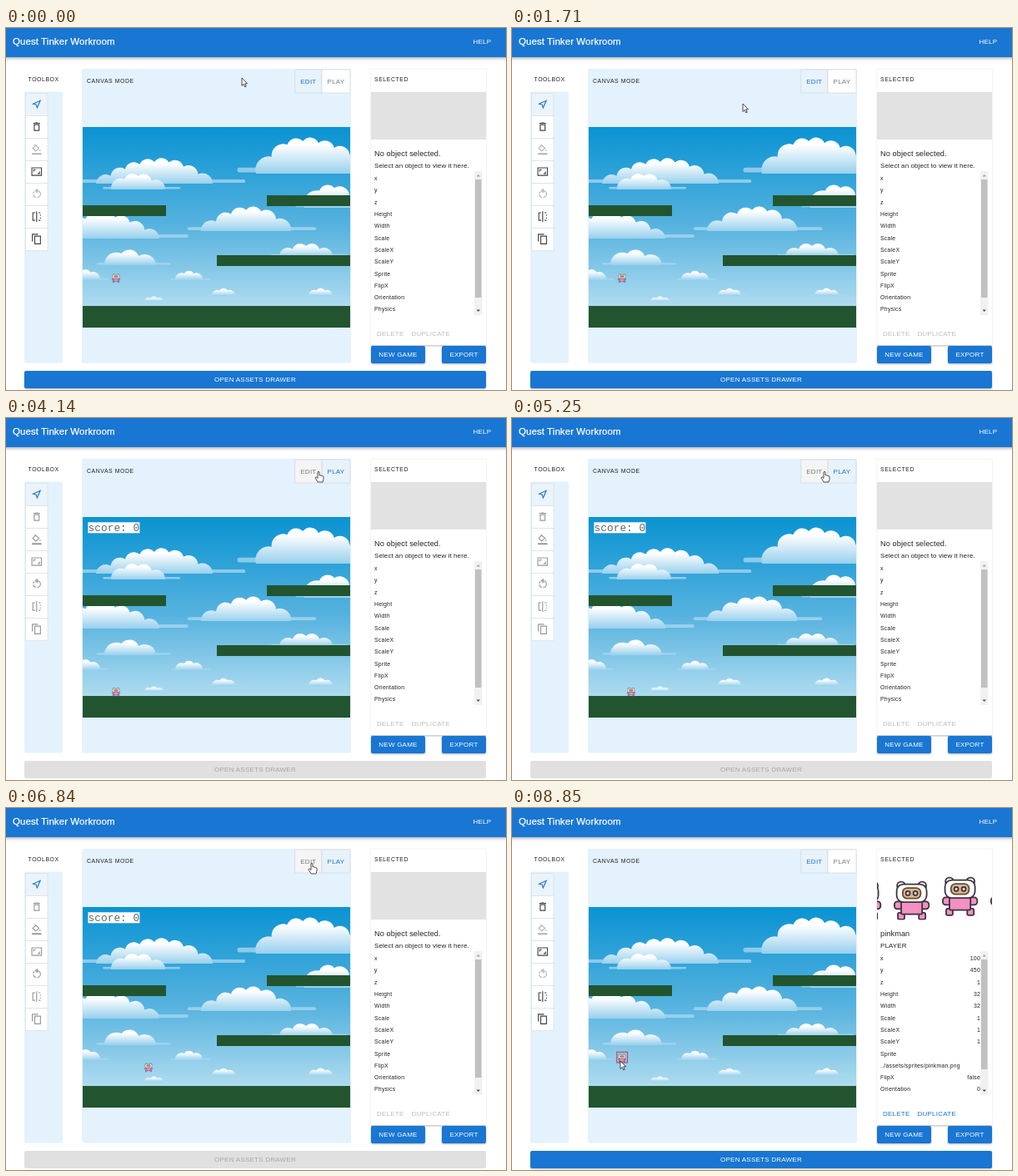
These frames come from a looping animation (600 by 435 pixels, 8.88 s). An HTML page:

```html
<!DOCTYPE html>
<html lang="en">
<head>
<meta charset="utf-8">
<title>Game editor</title>
<style>
  html, body { margin: 0; width: 100%; height: 100%; overflow: hidden; background: #fff; }
  svg { display: block; width: 100vw; height: 100vh; }
  text { font-family: "Liberation Sans", Arial, sans-serif; white-space: pre; }
  .mono { font-family: "Liberation Mono", "Courier New", monospace; }
  .bar { filter: drop-shadow(0 1px 2px rgba(0,0,0,.4)); }
  .raised { filter: drop-shadow(0 1px 1px rgba(0,0,0,.28)); }
</style>
</head>
<body>
<svg id="stage" viewBox="0 0 600 435"></svg>
<script>
const LOOP = 8880, PLAY_AT = 2400, EDIT_AT = 7020, SELECT_AT = 8350;
const BLUE = '#1976d2', PALE = '#e3f2fd', GREEN = '#22552f', INK = '#222';
const stage = document.getElementById('stage');

const rect = (x, y, w, h, fill, more = '') =>
  `<rect x="${x}" y="${y}" width="${w}" height="${h}" fill="${fill}" ${more}/>`;
const text = (x, y, str, size, gap, fill, more = '') =>
  `<text x="${x}" y="${y}" font-size="${size}" letter-spacing="${gap}" fill="${fill}" ${more}>${str}</text>`;
const MID = 'text-anchor="middle"', END = 'text-anchor="end"';
const label = (x, y, str, fill, more) => text(x, y, str, 8.03, .23, fill, more);
const small = (x, y, str, more) => text(x, y, str, 6.9, .23, INK, more);
const overline = (x, y, str) => text(x, y, str, 6.9, .57, INK);
const button = (x, y, w, str, on = true) =>
  rect(x, y, w, 21, on ? BLUE : '#e0e0e0', `rx="2" ${on ? 'class="raised"' : ''}`) +
  label(x + w / 2, y + 13.4, str, on ? '#fff' : '#a6a6a6', MID);

// A mound of arcs on a flat base, with a thin streak of mist across its foot.
function cloud(x1, x2, top, base, peak = .5) {
  const w = x2 - x1, h = base - top, n = Math.max(3, Math.round(w / 18));
  let d = `M${x1} ${base}`, px = x1, py = base;
  for (let i = 1; i <= n; i++) {
    const u = i / n, s = u < peak ? u / peak / 2 : 1 - (1 - u) / (1 - peak) / 2;
    const x = x1 + w * u, y = base - h * .85 * Math.sin(Math.PI * s);
    const r = Math.hypot(x - px, y - py) * .58;
    d += `A${r} ${r} 0 0 1 ${x} ${y}`;
    [px, py] = [x, y];
  }
  return rect(x1 - w * .15, base - h * .16, w * 1.43, h * .13, '#abd9f0', `rx="${h * .06}" opacity=".75"`) +
    `<path d="${d}Z" fill="url(#puff)"/>`;
}
const sky = [
  cloud(108, 248, 156, 187, .55), cloud(126, 191, 175, 194, .45), cloud(300, 450, 129, 175, .36),
  cloud(358, 430, 187, 216, .4), cloud(60, 184, 221, 253, .43), cloud(234, 342, 214, 244, .56),
  cloud(328, 392, 260, 274), cloud(118, 180, 268, 285, .4), cloud(78, 113, 290, 303),
  cloud(203, 236, 292, 303), cloud(166, 189, 323, 329), cloud(247, 275, 313, 322), cloud(363, 392, 313, 322),
].join('');

// Both sides of the body are mirrored around x = 12.
const pair = part => [-1, 1].map(side => part(12 + 7 * side)).join('');
const dot = (x, y, r, fill) => `<circle cx="${x}" cy="${y}" r="${r}" fill="${fill}"/>`;
const hero = `<g stroke="#3b3340" stroke-width="1">
  ${pair(x => dot(x, 3, 2.7, '#fff'))}${pair(x => rect(x - 2.2, 21, 4.4, 4.5, '#f490c2', 'rx="1"'))}
  ${rect(.5, 13.5, 23, 5, '#f490c2', 'rx="2"')}${rect(5, 13, 14, 9, '#f490c2', 'rx="1"')}
  ${rect(2, 2, 20, 12, '#fff', 'rx="4.5"')}${rect(6, 4.5, 12, 7, '#dcb68d', 'rx="3" stroke="#6b4a35"')}
  ${dot(9.5, 8, 1.4, '#f0d8b8')}${dot(14.5, 8, 1.4, '#f0d8b8')}</g>`;

const ICONS = [
  'M4.5 11.3L19.5 4.5 13 19.5 11 13Z',
  'M7 8h10v12H7zM5 5h14M9.5 4h5',
  'M4 10l6-6 7 6-7 6zM8 2l3 3M19 13v3M2 21h20M2 22.5h20',
  'M2 4h20v16H2zM6 12V8h4M18 12v4h-4',
  'M13 5a7 7 0 0 1 0 14M5 11a7 7 0 0 1 2-4M5 13a7 7 0 0 0 5 6M13 2v6l-4-3z',
  'M9 4H4v16h5M12 1v22M16 4h4M16 20h4M20 8v2M20 14v2',
  'M8 6h12v16H8zM3 17V2h12',
];
const PROPS = Object.entries({ x: 100, y: 450, z: 1, Height: 32, Width: 32, Scale: 1, ScaleX: 1, ScaleY: 1,
  Sprite: '', FlipX: 'false', Orientation: 0, Physics: '' });

function toolbox(play) {
  return ICONS.map((d, i) => {
    const idle = i === 2 || i === 4;
    const color = !i ? BLUE : play ? '#999' : idle ? '#b3b3b3' : '#444';
    const y = 78 + i * 27;
    return rect(23.5, y + .5, 26.5, 27, i ? '#fff' : '#ebf3fb', 'stroke="#dadfe4" stroke-width=".7"') +
      `<path transform="translate(29.9 ${y + 6.7}) scale(.574)" fill="none" stroke="${color}" stroke-width="2" d="${d}"/>`;
  }).join('');
}

function modeSwitch(play, hover) {
  const half = (x, w, str, on, over) =>
    rect(x, 50, w, 28, on ? '#e8f2fb' : over ? '#f5f5f5' : '#fff', 'stroke="#d5dadf" stroke-width=".8"') +
    label(x + w / 2, 66.6, str, on ? BLUE : '#7b7b7b', MID);
  return half(346.8, 32.2, 'EDIT', !play, hover === 'edit') +
    half(379, 34, 'PLAY', play, hover === 'play');
}

function details(sel) {
  const rows = [...PROPS];
  if (sel) rows.splice(9, 0, ['../assets/sprites/pinkman.png', '']);
  const strip = [0, 1, 2, 3].map(i =>
    `<g transform="translate(${400 + 58 * i} ${i < 2 ? 88 : 83}) scale(1.8)">${hero}</g>`).join('');
  const action = sel ? BLUE : '#bdbdbd';
  return (sel ? `<g clip-path="url(#preview)">${strip}</g>` : rect(438, 77, 138, 57, '#e2e2e2')) +
    text(442, 154, sel ? 'pinkman' : 'No object selected.', 9.18, .086, INK) +
    text(442, 168, sel ? 'PLAYER' : 'Select an object to view it here.', 8.03, .086, INK) +
    rows.slice(0, 12).map(([name, value], i) => {
      const y = 183.1 + i * 14.3;
      return small(442, y, name) + (sel ? small(562, y, value, END) : '');
    }).join('') +
    rect(562, 172, 9.5, 173, '#f1f1f1') + rect(563, 182, 7.5, sel ? 132 : 142, '#c1c1c1') +
    '<path d="M564.5 178.5h4.5l-2.25-2.5z" fill="#a3a3a3"/><path d="M564.5 338.5h4.5l-2.25 2.5z" fill="#505050"/>' +
    label(445, 370, 'DELETE', action) + label(486.5, 370, 'DUPLICATE', action);
}

const TIP = rect(364, 35, 64.5, 13.5, '#616161', 'rx="2" opacity=".95"') +
  text(396, 44, 'Preview your game', 6.31, 0, '#fff', MID + ' font-weight="bold"');

stage.innerHTML = `<defs>
  <linearGradient id="air" x1="0" x2="0" y1="0" y2="1">
    <stop offset="0" stop-color="#0a93d2"/><stop offset=".5" stop-color="#58b3df"/><stop offset=".9" stop-color="#b0dcf0"/></linearGradient>
  <linearGradient id="puff" x1="0" x2="0" y1="0" y2="1">
    <stop offset=".2" stop-color="#fff"/><stop offset="1" stop-color="#98d0ed"/></linearGradient>
  <clipPath id="game">${rect(92, 119, 321, 241, INK)}</clipPath>
  <clipPath id="preview">${rect(438, 77, 138, 57.5, INK)}</clipPath></defs>
  ${rect(0, 0, 600, 435, '#fff')}
  ${rect(-5, -5, 610, 40, BLUE, 'class="bar"')}
  ${text(8, 20.3, 'Quest Tinker Workroom', 11.48, .086, '#fff', 'stroke="#fff" stroke-width=".25"')}
  ${label(560.5, 19.3, 'HELP', '#fff')}
  ${overline(26.5, 64.3, 'TOOLBOX')}${rect(22, 76.5, 46, 326, PALE, 'rx="2"')}
  ${rect(91, 49, 323, 353.5, PALE, 'rx="2"')}${overline(97, 65.5, 'CANVAS MODE')}
  ${rect(437.7, 49, 138.6, 333, '#fff', 'stroke="#eee" stroke-width=".7"')}${overline(442, 64.3, 'SELECTED')}
  ${rect(438, 381.5, 138, .8, '#aaa')}
  ${button(438, 382, 65, 'NEW GAME')}${button(523, 382, 53, 'EXPORT')}
  <g clip-path="url(#game)">${rect(92, 119, 321, 241, 'url(#air)')}${sky}
    ${rect(92, 213, 100, 13, GREEN)}${rect(313, 201, 100, 13, GREEN)}
    ${rect(253, 273, 160, 13, GREEN)}${rect(92, 334, 321, 26, GREEN)}
    <g id="score">${rect(98.4, 125.3, 62, 13, '#fff')}${text(98.6, 135.6, 'score: 0', 12.84, 0, '#666', 'class="mono"')}</g>
    <g id="hero">${hero}</g>
    <g id="box">${rect(125.8, 293.2, 12.8, 12.8, 'none', 'stroke="#d32f4f" stroke-width="1"')}</g></g>
  <g id="ui"></g>
  <g id="arrow"><path d="M0 0V9.4L2.2 7.4 3.7 10.8 5.2 10.2 3.7 6.8H6.6Z" fill="#fff" stroke="#222" stroke-width=".8"/></g>
  <g id="hand"><path d="M-1 1Q0-.6 1 1V4.8Q2.2 4 2.9 5.2 4.2 4.6 4.7 5.8 6 5.4 6 7V9.4L5 13H-.8L-3.7 8.4Q-4.2 6.8-2.7 7L-1 8.5Z" fill="#fff" stroke="#222" stroke-width=".8"/></g>`;

const el = Object.fromEntries([...stage.querySelectorAll('g[id]')].map(n => [n.id, n]));
const show = (node, on) => node.setAttribute('display', on ? 'inline' : 'none');
const move = (node, x, y, more = '') => node.setAttribute('transform', `translate(${x} ${y}) ${more}`);

// The pointer rests at each stop until `leave`, then eases to the next one.
const STOPS = [
  { arrive: 0, leave: 600, x: 283, y: 60 },
  { arrive: 1500, leave: 1800, x: 277, y: 91 },
  { arrive: 2330, leave: 3400, x: 403, y: 65 },
  { arrive: 3850, leave: 6300, x: 375, y: 64 },
  { arrive: 6700, leave: 7150, x: 367, y: 66 },
  { arrive: 8150, leave: LOOP, x: 130, y: 304 },
];
function pointer(t) {
  const i = STOPS.findIndex(s => t < s.leave), b = STOPS[i];
  if (t >= b.arrive) return [b.x, b.y];
  const a = STOPS[i - 1], u = (t - a.leave) / (b.arrive - a.leave), e = u * u * (3 - 2 * u);
  return [a.x + (b.x - a.x) * e, a.y + (b.y - a.y) * e];
}

// Player position in play mode; speeds in stage pixels per second.
function player(t) {
  const FLOOR = 328, G = 60;
  const held = (a, b) => Math.max(0, Math.min(t, b) - a) / 1000;
  const x = 132 + 64 * held(5080, 6100) - 64 * held(6100, 6510);
  const fall = held(PLAY_AT, EDIT_AT), jump = held(6700, EDIT_AT);
  const y = jump ? FLOOR - 132 * jump + G * jump * jump : Math.min(FLOOR, 299.5 + G * fall * fall);
  return [x, y, t > 6100 ? -1 : 1];
}

let shown = '';
function draw(now) {
  const t = now % LOOP;
  const play = t >= PLAY_AT && t < EDIT_AT, sel = t >= SELECT_AT;
  const [px, py] = pointer(t);
  const over = px > 347 && px < 413 && py > 50 && py < 78;
  const hover = over ? (px < 379 ? 'edit' : 'play') : '';
  const tip = hover === 'play' && t > PLAY_AT;

  const key = [play, sel, hover, tip].join();
  if (key !== shown) {
    shown = key;
    el.ui.innerHTML = toolbox(play) + modeSwitch(play, hover) + details(sel) +
      button(22, 412, 554, 'OPEN ASSETS DRAWER', !play) + (tip ? TIP : '');
  }
  const [x, y, face] = play ? player(t) : [132, 299.5, 1];
  move(el.hero, x, y, `scale(${.4 * face} .4) translate(-12 -10)`);
  show(el.score, play);
  show(el.box, sel);
  show(el.hand, over);
  show(el.arrow, !over);
  move(over ? el.hand : el.arrow, px, py);
}
const start = performance.now();
(function tick() {
  draw(performance.now() - start);
  requestAnimationFrame(tick);
})();
</script>
</body>
</html>
```
